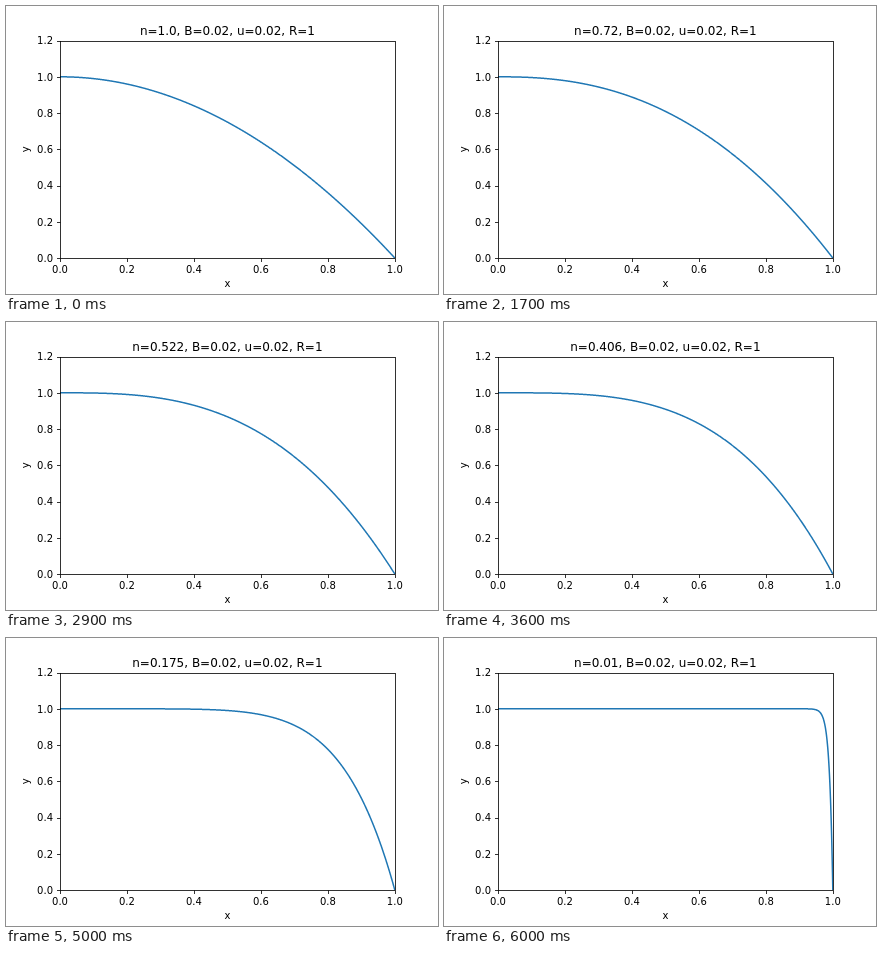
Animation, 432 px wide and 288 px high, one loop 6.1 s. Source, as an HTML page with a canvas:

```html
<!DOCTYPE html>
<html lang="en">
<head>
<meta charset="utf-8">
<title>Flow profile</title>
<style>
  html, body { margin: 0; width: 100%; height: 100%; overflow: hidden; background: #fff; }
  canvas { display: block; }
</style>
</head>
<body>
<canvas id="plot" width="432" height="288"></canvas>
<script>
const ctx = document.getElementById('plot').getContext('2d');
const LEFT = 54, RIGHT = 388.8, TOP = 34.56, BOTTOM = 252;
const Y_MAX = 1.2, STEPS = 61, STEP_MS = 100;
const MID_X = (LEFT + RIGHT) / 2, MID_Y = (TOP + BOTTOM) / 2;

const px = x => LEFT + x * (RIGHT - LEFT);
const py = y => BOTTOM - y / Y_MAX * (BOTTOM - TOP);
const snap = v => Math.round(v) + 0.5;

// Three decimals, ties to the even digit
function round3(v) {
  const scaled = v * 1000, low = Math.floor(scaled);
  const up = scaled - low === 0.5 ? low % 2 : scaled - low > 0.5;
  return (low + Number(up)) / 1000;
}

function label(text, x, y, size = 10, align = 'center') {
  ctx.font = `${size}px "DejaVu Sans", sans-serif`;
  ctx.textAlign = align;
  ctx.fillText(text, x, y);
}

function segment(x1, y1, x2, y2) {
  ctx.beginPath();
  ctx.moveTo(x1, y1);
  ctx.lineTo(x2, y2);
  ctx.stroke();
}

function drawCurve(n) {
  const power = 1 / n + 1, samples = 1000;
  ctx.save();
  ctx.beginPath();
  ctx.rect(LEFT, 35, 335, BOTTOM - 35);
  ctx.clip();
  ctx.beginPath();
  for (let i = 0; i <= samples; i++) {
    const x = i / samples;
    ctx.lineTo(px(x), py(1 - x ** power));
  }
  ctx.strokeStyle = '#1f77b4';
  ctx.lineWidth = 1.5;
  ctx.lineJoin = 'round';
  ctx.stroke();
  ctx.restore();
}

function drawAxes() {
  ctx.strokeStyle = ctx.fillStyle = '#000';
  ctx.lineWidth = 0.8;
  const x0 = snap(LEFT), y0 = snap(BOTTOM);
  for (let i = 0; i <= 6; i++) {
    const v = i / 5, text = v.toFixed(1);
    if (i < 6) {
      segment(snap(px(v)), y0, snap(px(v)), y0 + 3.5);
      label(text, px(v), 267);
    }
    segment(x0 - 3.5, snap(py(v)), x0, snap(py(v)));
    label(text, 47, Math.round(py(v) + 3.8), 10, 'right');
  }
  ctx.strokeRect(x0, snap(TOP), snap(RIGHT) - x0, y0 - snap(TOP));
  label('x', MID_X, 281);
  ctx.save();
  ctx.translate(23, MID_Y);
  ctx.rotate(-Math.PI / 2);
  label('y', 0, 0);
  ctx.restore();
}

function draw(step) {
  const n = 1 + step * ((0.01 - 1) / (STEPS - 1));
  const shown = step ? round3(n) : '1.0';
  ctx.fillStyle = '#fff';
  ctx.fillRect(0, 0, 432, 288);
  drawCurve(n);
  drawAxes();
  label(`n=${shown}, B=0.02, u=0.02, R=1`, MID_X, 29, 12);
}

const start = performance.now();
function tick() {
  const elapsed = performance.now() - start;
  draw(Math.floor(elapsed / STEP_MS) % STEPS);
  requestAnimationFrame(tick);
}
tick();
</script>
</body>
</html>
```
